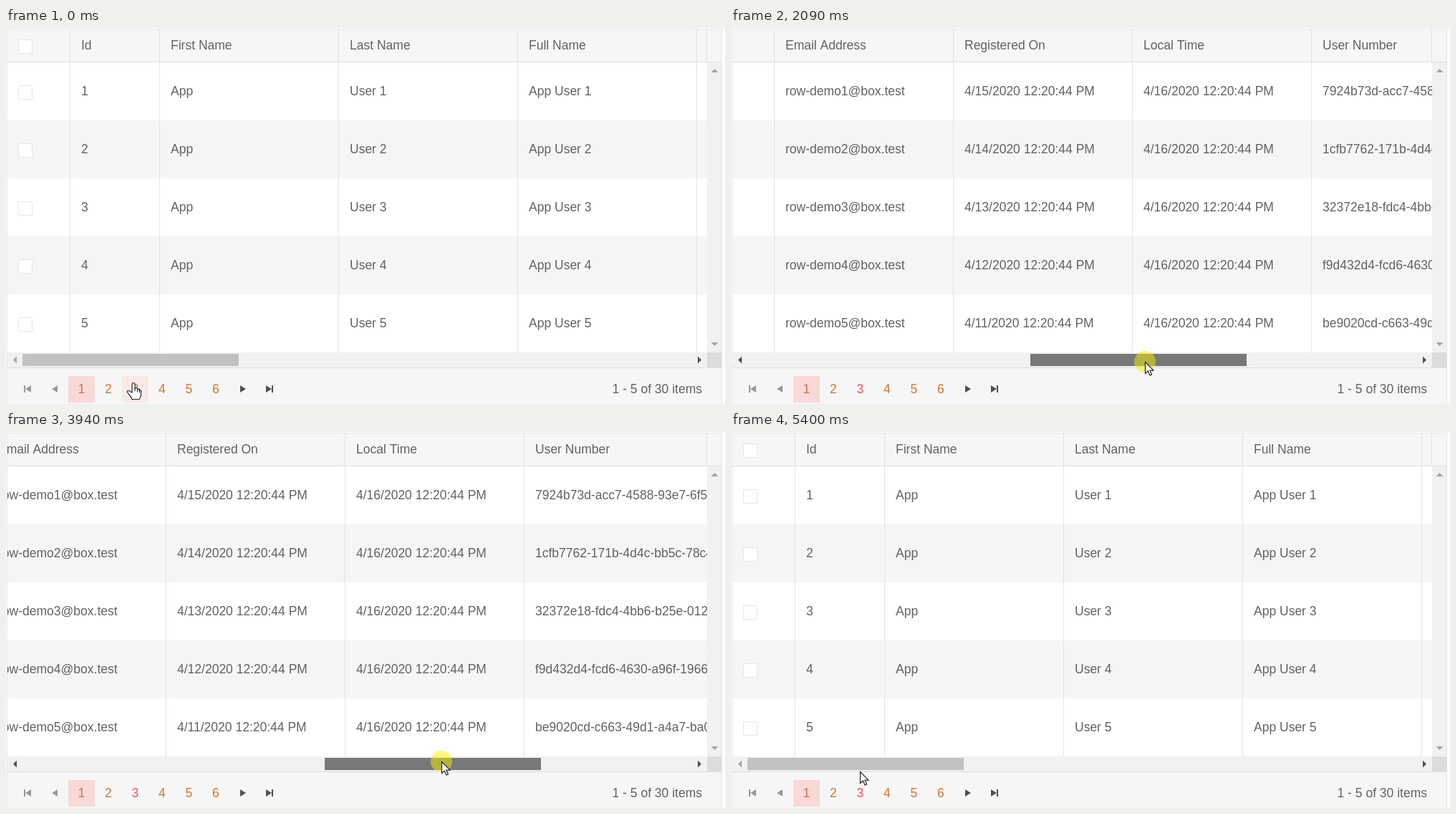
Write an HTML page with a canvas that moves like this. It is 1004 px wide and 525 px high and loops after 6.05 s.

```html
<!DOCTYPE html>
<html lang="en">
<head>
<meta charset="utf-8">
<title>Scrolling data grid</title>
<style>
  html, body { margin: 0; width: 100%; height: 100%; overflow: hidden; background: #fff; }
  canvas { display: block; }
</style>
</head>
<body>
<canvas id="stage" width="1004" height="525"></canvas>
<script>
const ctx = document.getElementById('stage').getContext('2d');
const LOOP = 6050, TICK = 110;
const MAX_SCROLL = 2053, THUMB_RATIO = 3.24;
const TEXT = '#626262', DIM = '#a3a3a3', DARK = '#505050', LINE = '#e4e4e4';

const ids = [
  '7924b73d-acc7-4588-93e7-6f59e2c65431',
  '1cfb7762-171b-4d4c-bb5c-78c4ec8bb2f1',
  '32372e18-fdc4-4bb6-b25e-0123484c1392',
  'f9d432d4-fcd6-4630-a96f-19661c2485f6',
  'be9020cd-c663-49d1-a4a7-ba00d24c8f3e'
];

// left edge, title, cell text for row n (1 to 5)
const columns = [
  [90, 'Id', n => n],
  [215, 'First Name', () => 'App'],
  [465, 'Last Name', n => `User ${n}`],
  [715, 'Full Name', n => `App User ${n}`],
  [965, 'Date of Birth', () => '1/1/1970 12:00:00 AM'],
  [1215, 'Age', () => 50],
  [1340, 'Email Address', n => `row-demo${n}@box.test`],
  [1590, 'Registered On', n => `4/${16 - n}/2020 12:20:44 PM`],
  [1840, 'Local Time', () => '4/16/2020 12:20:44 PM'],
  [2090, 'User Number', n => ids[n - 1]],
  [2465, 'Gender', n => n % 2 ? 'Female' : 'Male'],
  [2715, 'Command Column', () => '']
];

// tick, pointer x, pointer y, scroll offset
const keys = [
  [0, 178, 495, 0], [1, 183, 478, 0], [3, 188, 458, 0], [8, 188, 458, 0],
  [15, 398, 470, 672], [23, 773, 462, 1875], [25, 853, 458, MAX_SCROLL],
  [26, 831, 457, MAX_SCROLL], [27, 815, 456, 2031], [31, 756, 456, 1840],
  [41, 324, 472, 446], [45, 188, 474, 0], [49, 181, 475, 0], [55, 181, 475, 0]
];

// Monotone cubic through the keys
function track(tick, k) {
  const slope = i => keys[i + 1] && keys[i]
    ? (keys[i + 1][k] - keys[i][k]) / (keys[i + 1][0] - keys[i][0]) : 0;
  const tangent = i => {
    const a = slope(i - 1), b = slope(i);
    return a * b > 0 ? 2 * a * b / (a + b) : 0;
  };
  let i = 0;
  while (i < keys.length - 2 && tick >= keys[i + 1][0]) i++;
  const [p, q] = [keys[i], keys[i + 1]], h = q[0] - p[0], u = (tick - p[0]) / h;
  return p[k] + (q[k] - p[k]) * u * u * (3 - 2 * u)
    + h * u * (1 - u) * (tangent(i) * (1 - u) - tangent(i + 1) * u);
}

function rect(x, y, w, h, color) {
  ctx.fillStyle = color;
  ctx.fillRect(x, y, w, h);
}

function text(s, x, y, color = TEXT, align = 'left') {
  ctx.fillStyle = color;
  ctx.textAlign = align;
  ctx.fillText(s, x, y);
}

function box(x, y, w, h, fill, stroke) {
  ctx.beginPath();
  ctx.roundRect(x + .5, y + .5, w - 1, h - 1, 2);
  ctx.fillStyle = fill;
  ctx.fill();
  ctx.strokeStyle = stroke;
  ctx.lineWidth = 1;
  ctx.stroke();
}

// Triangle with its tip at (x, y); (dx, dy) leads from tip to base
function triangle(x, y, dx, dy, half, color) {
  const nx = dy ? half : 0, ny = dx ? half : 0;
  ctx.fillStyle = color;
  ctx.beginPath();
  ctx.moveTo(x, y);
  ctx.lineTo(x + dx + nx, y + dy + ny);
  ctx.lineTo(x + dx - nx, y + dy - ny);
  ctx.fill();
}

function shape(x, y, path, fill, stroke) {
  const p = new Path2D(path);
  ctx.save();
  ctx.translate(x, y);
  if (fill) { ctx.fillStyle = fill; ctx.fill(p); }
  if (stroke) { ctx.strokeStyle = stroke; ctx.lineWidth = 1.2; ctx.stroke(p); }
  ctx.restore();
}

function clipped(y, h, draw) {
  ctx.save();
  ctx.beginPath();
  ctx.rect(2, y, 977, h);
  ctx.clip();
  draw();
  ctx.restore();
}

function drawButtons(x, y) {
  box(x + 15, y + 21, 73, 38, '#f5f5f5', LINE);
  shape(x + 23, y + 32, 'M0 17L1 12L10 3L14 7L5 16ZM11.5 1.8L13 .3Q14 -.4 15 .5L16.6 2Q17.5 3 16.6 4L15.2 5.5Z', TEXT);
  shape(x + 23, y + 32, 'M3.5 13.5L11.5 5.5', null, '#d8d8d8');
  text('Edit', x + 46, y + 46);
  box(x + 93, y + 21, 95, 38, '#f5f5f5', LINE);
  shape(x + 101, y + 31, 'M0 3.5H15M5 3V.8H10V3M2 5.5V17.5H13V5.5M5 6V16M7.5 6V16M10 6V16', null, TEXT);
  text('Delete', x + 124, y + 46);
}

function drawGrid(scroll) {
  clipped(2, 45, () => {
    box(17 - scroll, 16, 20, 20, '#fff', LINE);
    for (const [left, title] of columns) {
      rect(left - scroll - 1, 2, 1, 45, '#e0e0e0');
      text(title, left - scroll + 15, 30);
    }
  });
  rect(978, 2, 1, 45, '#dedede');
  rect(2, 47, 997, 1, '#dedede');

  clipped(48, 405, () => {
    for (let n = 1; n <= 5; n++) {
      const y = 81 * n - 33;
      rect(2, y, 977, 81, n % 2 ? '#fff' : '#f5f5f5');
      box(17 - scroll, y + 32, 20, 20, '#fff', LINE);
      for (const [left, , cell] of columns) {
        rect(left - scroll - 1, y, 1, 81, LINE);
        text(cell(n), left - scroll + 15, y + 46);
      }
      drawButtons(2715 - scroll, y);
    }
  });
}

function drawScrollbars(scroll, thumbColor) {
  rect(979, 48, 20, 405, '#f1f1f1');
  triangle(989.5, 57, 0, 5, 5, DIM);
  triangle(989.5, 444, 0, -5, 5, DIM);
  rect(2, 453, 977, 21, '#f1f1f1');
  rect(979, 453, 20, 21, '#dcdcdc');
  rect(Math.round(23 + scroll / THUMB_RATIO), 455, 302, 17, thumbColor);
  triangle(10, 463.5, 5, 0, 5, scroll > 0 ? DARK : DIM);
  triangle(971, 463.5, -5, 0, 5, scroll < MAX_SCROLL ? DARK : DIM);
}

function drawPager(hovering) {
  rect(2, 474, 997, 1, '#dedede');
  rect(2, 475, 997, 50, '#f6f6f6');
  rect(25, 499, 2, 10, '#999');
  triangle(27, 504, 8, 0, 5, '#999');
  triangle(64, 504, 8, 0, 5, '#999');
  triangle(335, 504, -8, 0, 5, DARK);
  triangle(371, 504, -8, 0, 5, DARK);
  rect(371, 499, 2, 10, DARK);
  rect(87, 486, 37, 37, '#f8d9d7');
  if (hovering) rect(162, 486, 37, 37, '#f9e9e8');
  for (let n = 1; n <= 6; n++) {
    const color = n === 1 ? '#c8744c' : n === 3 && !hovering ? '#f5505c' : '#d6752f';
    text(n, 67.8 + 37.5 * n, 510, color, 'center');
  }
  text('1 - 5 of 30 items', 972, 510, TEXT, 'right');
}

function drawPointer(x, y, hand, pressed) {
  if (pressed) {
    ctx.fillStyle = 'rgba(244,240,0,.5)';
    ctx.beginPath();
    ctx.arc(x - 1, y - 1, 15, 0, 7);
    ctx.fill();
  }
  if (hand) {
    shape(x, y, 'M-2 14V2Q-2 .5 0 .5T2 2V8Q4.5 6.5 5.5 9Q8 8 8.5 10.5Q10.5 9.5 10.5 12.5V17Q10.5 20 8 23.5H-2Q-3 20 -6 17L-8.5 13.5Q-9 11 -6 11.5Z', '#fff', '#222');
    shape(x, y, 'M2 8V12M5.5 9V13M8.5 10.5V14', null, '#222');
  } else {
    shape(x - .5, y - .5, 'M0 0V16L3.8 12.5L6.5 18.5L9 17.4L6.5 11.7H11.5Z', '#fff', '#222');
  }
}

function draw(time) {
  const tick = Math.floor((time % LOOP + 15) / TICK) % (LOOP / TICK);
  const [x, y, scroll] = [1, 2, 3].map(k => Math.round(track(tick, k)));
  const hand = tick === 0, pressed = tick >= 5 && tick < 47;
  const hovered = tick >= 2 && tick < 5;

  ctx.font = '17.5px "Liberation Sans", Arial, sans-serif';
  rect(0, 0, 1004, 525, '#fff');
  rect(1, 1, 999, 524, LINE);
  rect(2, 2, 997, 523, '#f6f6f6');
  drawGrid(scroll);
  drawScrollbars(scroll, pressed ? '#787878' : hovered ? '#a8a8a8' : '#c1c1c1');
  drawPager(hand);
  drawPointer(x, y, hand, pressed);
}

const start = performance.now();
function frame() {
  draw(performance.now() - start);
  requestAnimationFrame(frame);
}
frame();
</script>
</body>
</html>
```
